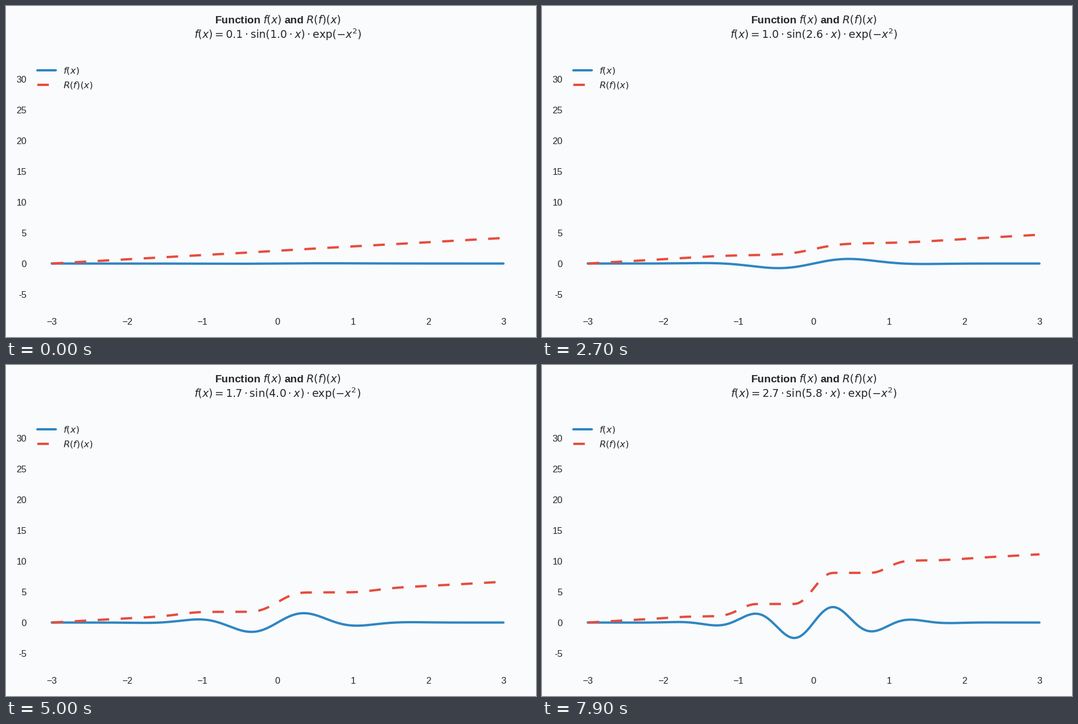
A matplotlib script that plays this animation: 947x592 px, repeating every 8 s.

```python
import numpy as np
import matplotlib.pyplot as plt
from matplotlib.animation import FuncAnimation

W, H, DPI = 947, 592, 98.65
FRAMES, STEP_MS = 80, 100
SWEEP = 149  # steps in the full parameter sweep

BG, INK, BLUE, RED = "#f9fbfd", "#262626", "#2e86c1", "#e74c3c"

# Axes box and vertical scale, in pixels from the top left
LEFT, RIGHT, TOP, BOTTOM = 41.4, 929.2, 92.4, 553.5
ZERO_Y, UNIT = 460.6, 10.985

plt.rcParams.update({
    "font.family": "Liberation Sans",
    "font.size": 12,
    "text.color": INK,
    "xtick.labelcolor": INK,
    "ytick.labelcolor": INK,
    "lines.linewidth": 3,
    "lines.solid_capstyle": "round",
})

x = np.linspace(-3, 3, 1000)


def curves(i):
    """Amplitude, frequency, f and the running integral of softplus(f')."""
    a = 0.1 + 4.9 * i / SWEEP
    k = 1 + 9 * i / SWEEP
    bell = np.exp(-x**2)
    f = a * np.sin(k * x) * bell
    slope = a * bell * (k * np.cos(k * x) - 2 * x * np.sin(k * x))
    rate = np.logaddexp(0, slope)
    area = np.cumsum((rate[1:] + rate[:-1]) / 2 * np.diff(x))
    return a, k, f, np.concatenate(([0], area))


# The small excess keeps the pixel size from being rounded down
fig = plt.figure(figsize=((W + 0.01) / DPI, (H + 0.01) / DPI), dpi=DPI, facecolor=BG)
ax = fig.add_axes([LEFT / W, 1 - BOTTOM / H, (RIGHT - LEFT) / W, (BOTTOM - TOP) / H],
                  facecolor=BG)
ax.set_xlim(-3.3, 3.3)
ax.set_ylim((ZERO_Y - BOTTOM) / UNIT, (ZERO_Y - TOP) / UNIT)
ax.set_xticks(range(-3, 4))
ticks = range(-5, 31, 5)
ax.set_yticks(ticks, [str(t) for t in ticks])
ax.tick_params(length=0, pad=3.5)
ax.spines[:].set_visible(False)

f_line, = ax.plot([], [], color=BLUE, label="$f(x)$")
r_line, = ax.plot([], [], color=RED, linestyle=(0, (5, 5)), label="$R(f)(x)$")
ax.legend(loc="upper left", frameon=False)
title = ax.set_title("", fontsize=14, fontweight="bold", pad=25)


def update(i):
    a, k, f, r = curves(i)
    f_line.set_data(x, f)
    r_line.set_data(x, r)
    title.set_text("Function $f(x)$ and $R(f)(x)$\n"
                   rf"$f(x) = {a:.1f} \cdot \sin({k:.1f} \cdot x) \cdot \exp(-x^2)$")
    return f_line, r_line, title


anim = FuncAnimation(fig, update, frames=FRAMES, interval=STEP_MS, repeat=True)
plt.show()
```
